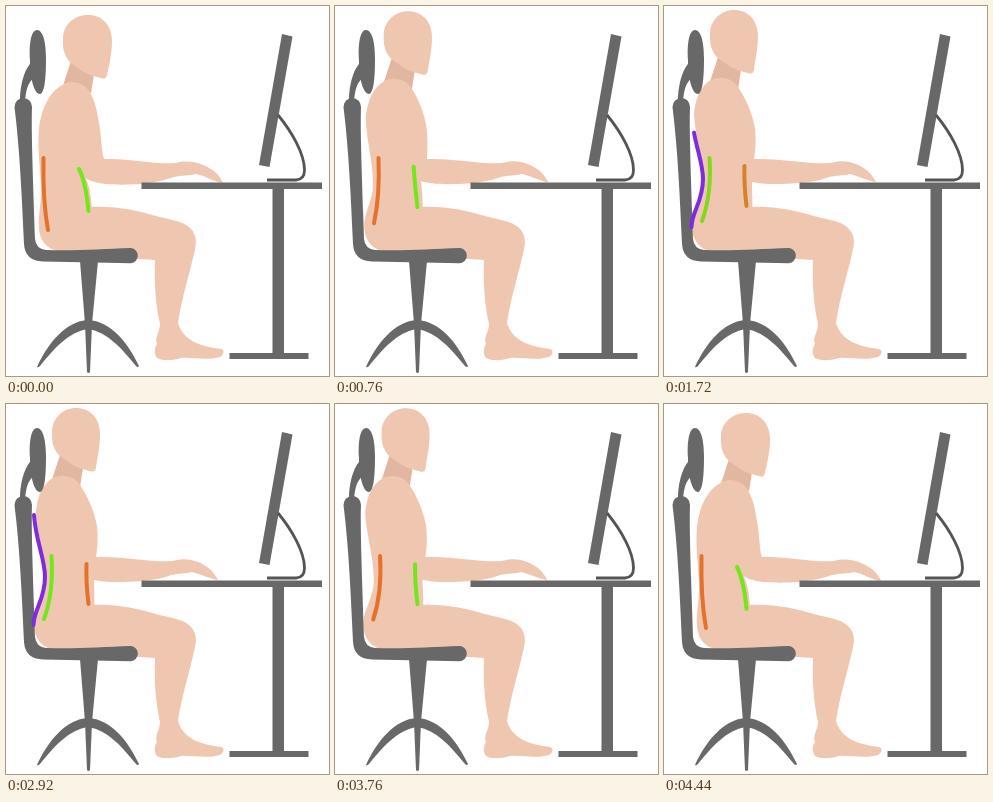
Write an HTML page that moves like this. It is 323 px wide and 370 px high and loops after 4.48 s.

```html
<!DOCTYPE html>
<html lang="en">
<head>
<meta charset="utf-8">
<title>Sitting posture</title>
<style>
  html, body { margin: 0; width: 100%; height: 100%; overflow: hidden; background: #fff; }
  svg { display: block; width: 323px; height: 370px; }
  .skin { fill: #efc7b1; }
  .grey { fill: #686868; }
  .line { fill: none; stroke-width: 4; stroke-linecap: round; }
</style>
</head>
<body>
<svg viewBox="0 0 323 370">
  <!-- desk and screen -->
  <g class="grey">
    <path d="M276 28L286.500 30.500L263.500 161L253 159Z"/>
    <path d="M266.500 180H278V350H266.500Z"/>
    <path d="M223.500 347H302.500V353H223.500Z"/>
  </g>
  <path d="M272 109C286 126 298.500 148 298.500 164Q298.500 173.500 290 174H261" fill="none" stroke="#545454" stroke-width="2.800"/>

  <!-- person -->
  <path class="skin" d="M60 201H86C112 200 132 205 150 210C165 214 176 215 183 221C190 227 191 235 189 243C184 267 176 290 172 317C176 330 187 340 215 343C219 344 218 349 214 351C200 355 186 351 175 352C165 355 157 355 151 352C148 348 148 343 151 338C148 332 154 326 154 318C150 300 148 280 149 254L118 252L60 247Z"/>
  <path id="neck" fill="#e2b7a1"/>
  <path id="torso" class="skin"/>
  <path id="head" class="skin"/>

  <!-- chair and desk top -->
  <g class="grey">
    <path d="M135.500 176.500H316V183H135.500Z"/>
    <path d="M31 24C37 24 40 36 40 52C40 70 39 87 34 88C28 88 24 72 24 54C23 38 25 24 31 24Z"/>
    <path d="M14 95C14 78 19 61 27 55L28 72C21 77 20 86 19 95Z"/>
    <path d="M8.500 101A8.700 9 0 0 1 26 101C25 125 27.500 185 29 233Q30 243 40 244C70 245 95 243 125 242A7.700 7.700 0 0 1 125 257.300L37 255.500Q19 255 18 238C16 195 14 145 8.500 101Z"/>
    <path d="M74 255H92L86 318L84 366Q82.500 368 81 366L79 318Z"/>
    <path d="M31 361C42 337 60 315 82 314C105 315 122 337 133 360Q132 362 130 360C117 344 102 326 82 323C62 326 47 344 34 360Q32 362 31 361Z"/>
  </g>

  <path id="back" class="line"/>
  <path id="front" class="line"/>
  <path id="support" class="line" stroke="#7f2be0" pathLength="1"
    d="M27.500 221C27.500 206 39 196 39 173C39 155 30 138 28 111"/>
</svg>
<script>
const LOOP = 4480, STEP = 40;
const ORANGE = [229, 114, 44], GREEN = [118, 230, 28];

// Each part as [slouched, upright]
const poses = {
  head: [
    'M82 9C96 9 106 19 106 35C106 48 103 60 101 69Q100 74 95 72C86 70 78 67 72 62C61 56 56 47 57 33C57 19 68 9 82 9Z',
    'M70 4C84 4 94 14 94 30C94 43 91 55 90 64Q89 69 84 67C75 65 67 62 61 57C50 51 45 42 46 28C46 14 57 4 70 4Z'],
  neck: [
    'M66 52L56.500 81L85 87L88 68Z',
    'M55 48L45.500 77L74 83L77 64Z'],
  torso: [
    'M58 78C44 85 36 100 33 122C31 145 35 165 35 185C35 200 32 208 33 222C34 238 45 246 60 246L120 246L110 203L86 203C85 190 84 182 80 172C86 177 100 180 135 178C150 176 160 174 168 171C176 169 184 170 190 168C200 170 208 176 217 177C214 169 207 163 197 159C190 156 180 154 170 157C150 159 125 152 98 153C95 145 96 130 92 112C91 105 89 94 83 85C79 78 68 73 58 78Z',
    'M47 74C36 80 31 94 30 108C31 130 39 150 39 176C39 194 28 205 28 220C28 236 38 245 50 246L120 246L110 203L88.500 203C88.500 192 88 184 88 176C97 178 112 179 135 177C148 176 158 174 165 171C173 169 180 170 186 168C195 170 204 175 212 176C208 168 202 162 192 158C185 155 176 154 167 157C147 159 120 152 90 153C92 142 92 132 91 122C88 106 81 91 74 81C69 73 58 69 47 74Z'],
  back: [
    'M37.500 152C37 175 38 202 42 224',
    'M45.500 152C47 175 45 196 38 215'],
  front: [
    'M73 163C78 173 81 188 82.500 205',
    'M80.500 160C80 174 81 188 82.500 200']
};

const el = id => document.getElementById(id);
const clamp = x => Math.min(1, Math.max(0, x));
const mix = (a, b, k) => a + (b - a) * k;
const ramp = (t, from, to) => clamp((t - from) / (to - from));

// Rises during [a, b], falls during [c, d]
const pulse = (t, a, b, c, d) => ramp(t, a, b) - ramp(t, c, d);

function morph([a, b], k) {
  const ends = b.match(/[\d.]+/g);
  let i = 0;
  return a.replace(/[\d.]+/g, n => mix(+n, +ends[i++], k).toFixed(2));
}

const blend = (a, b, k) => `rgb(${a.map((v, i) => Math.round(mix(v, b[i], k)))})`;

function draw(now) {
  const t = Math.floor(now % LOOP / STEP) * STEP;
  const upright = pulse(t, 40, 1000, 3720, 4440);
  const held = pulse(t, 1100, 1820, 2920, 3640);

  for (const id in poses) el(id).setAttribute('d', morph(poses[id], upright));
  el('back').style.stroke = blend(ORANGE, GREEN, held);
  el('front').style.stroke = blend(GREEN, ORANGE, held);
  el('support').style.strokeDasharray = `${held} 2`;
  el('support').style.visibility = held > 0 ? 'visible' : 'hidden';
  requestAnimationFrame(draw);
}

requestAnimationFrame(draw);
</script>
</body>
</html>
```
